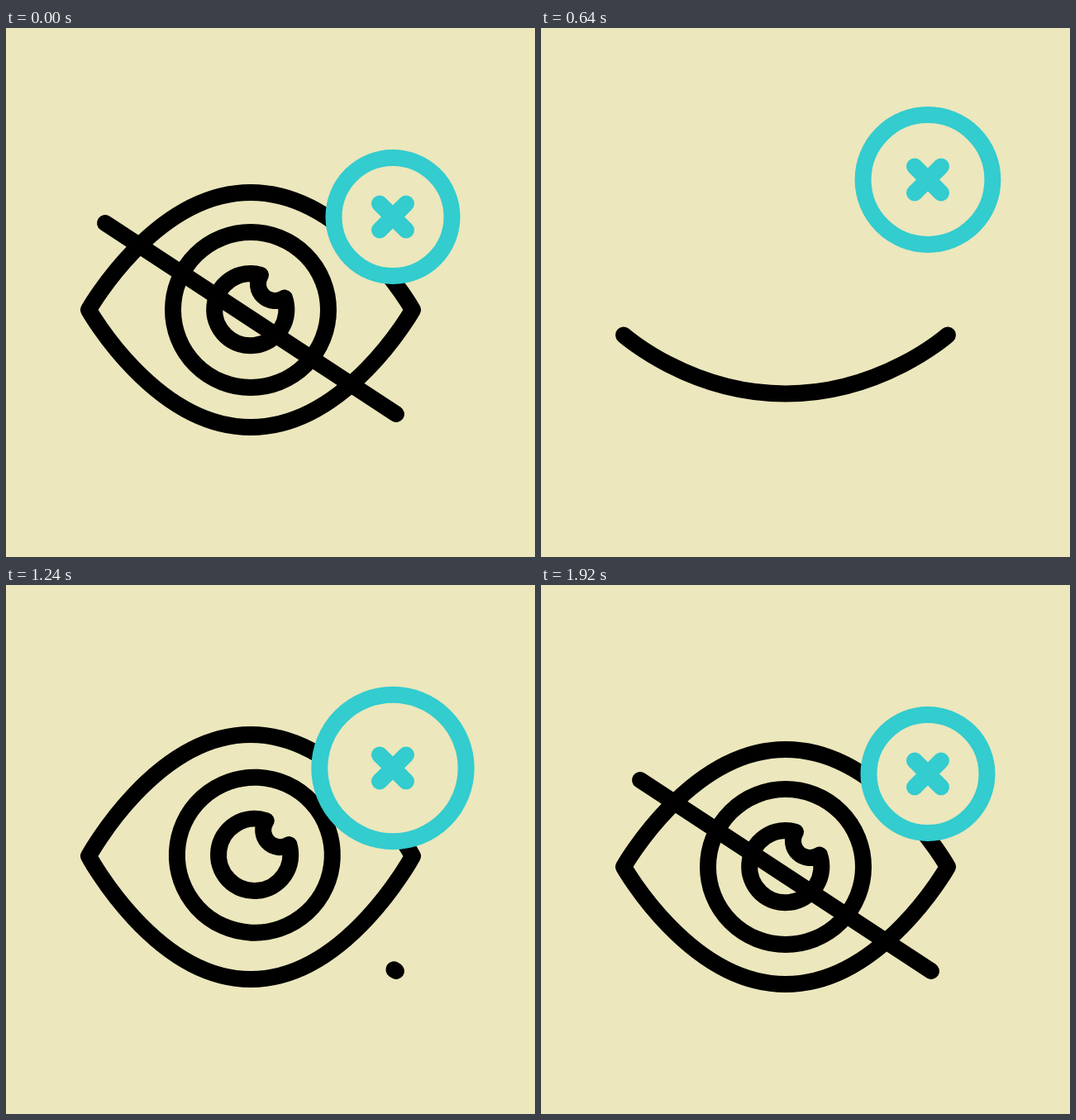
An HTML page with a canvas that plays this animation: 640x640 px, repeating every 2240 ms.

```html
<!DOCTYPE html>
<html lang="en">
<head>
<meta charset="utf-8">
<title>Hidden eye</title>
<style>
  html, body { margin: 0; width: 100%; height: 100%; overflow: hidden; background: #ece7bc; }
  canvas { display: block; }
</style>
</head>
<body>
<canvas id="stage" width="640" height="640"></canvas>
<script>
const LOOP = 2240, STEP = 40;
const PAPER = '#ece7bc', INK = '#000', TEAL = '#33cccf';
const ctx = document.getElementById('stage').getContext('2d');

// Eased 0 to 1 between two times.
function ease(t, from, to) {
  const u = Math.min(1, Math.max(0, (t - from) / (to - from)));
  return u * u * (3 - 2 * u);
}

// Rises to 1, holds, then falls back to 0.
const pulse = (t, rise, high, fall, low) => ease(t, rise, high) - ease(t, fall, low);

function ring(x, y, r) {
  ctx.beginPath();
  ctx.arc(x, y, r, 0, 2 * Math.PI);
}

function segment(x0, y0, x1, y1) {
  ctx.beginPath();
  ctx.moveTo(x0, y0);
  ctx.lineTo(x1, y1);
  ctx.stroke();
}

function eyeOutline(corner, top, bottom) {
  return new Path2D(`M100 ${corner}C100 ${corner} 180 ${top} 296 ${top}S492 ${corner} 492 ${corner}
    C492 ${corner} 412 ${bottom} 296 ${bottom}S100 ${corner} 100 ${corner}Z`);
}

// Pupil with a round bite for the highlight, centred on the origin.
const pupil = new Path2D('M12 -42.2A20.5 20.5 0 0 0 41 -14.5A43.6 43.6 0 1 1 12 -42.2Z');

function drawIris(x, y, turn) {
  ctx.translate(x, y);
  ctx.rotate(turn);
  ring(0, 0, 94);
  ctx.stroke();
  ctx.stroke(pupil);
}

function drawEye(t) {
  const wide = pulse(t, 0, 320, 1240, 1600);
  const shut = pulse(t, 165, 515, 792, 1120);
  const gaze = pulse(t, 0, 482, 880, 1306);
  const corner = 341 - 13 * wide + 43.5 * pulse(t, 320, 640, 880, 1240);
  const top = corner - 142 - 5 * wide + 218 * shut;
  const bottom = corner + 142 + 7 * wide - 78 * shut;
  const outline = eyeOutline(corner, top, bottom);

  ctx.strokeStyle = INK;
  ctx.save();
  ctx.clip(outline);
  drawIris(296 + 75 * gaze, corner - 19.5 * gaze, 0.7 * gaze);
  ctx.restore();
  ctx.stroke(outline);
}

function drawSlash(t) {
  const gone = pulse(t, 0, 440, 1211, 1783);
  if (gone < 1) segment(120 + 352 * gone, 236 + 231 * gone, 472, 467);
}

function drawBadge(t) {
  const x = 468, y = 228.5 - 45 * pulse(t, 0, 400, 880, 1360);
  const grow = pulse(t, 0, 408, 1368, 1760);
  const shrink = pulse(t, 400, 880, 880, 1368);
  ctx.strokeStyle = TEAL;
  ctx.fillStyle = PAPER;
  ring(x, y, 71.5 + 22.5 * grow - 31.2 * shrink);
  ctx.fill();
  ctx.stroke();
  for (const side of [-16, 16]) segment(x - side, y - 16, x + side, y + 16);
}

function draw(t) {
  ctx.fillStyle = PAPER;
  ctx.fillRect(0, 0, 640, 640);
  ctx.lineWidth = 20;
  ctx.lineCap = ctx.lineJoin = 'round';
  drawEye(t);
  drawSlash(t);
  drawBadge(t);
}

function tick() {
  draw(Math.floor(performance.now() % LOOP / STEP) * STEP);
  requestAnimationFrame(tick);
}
tick();
</script>
</body>
</html>
```
